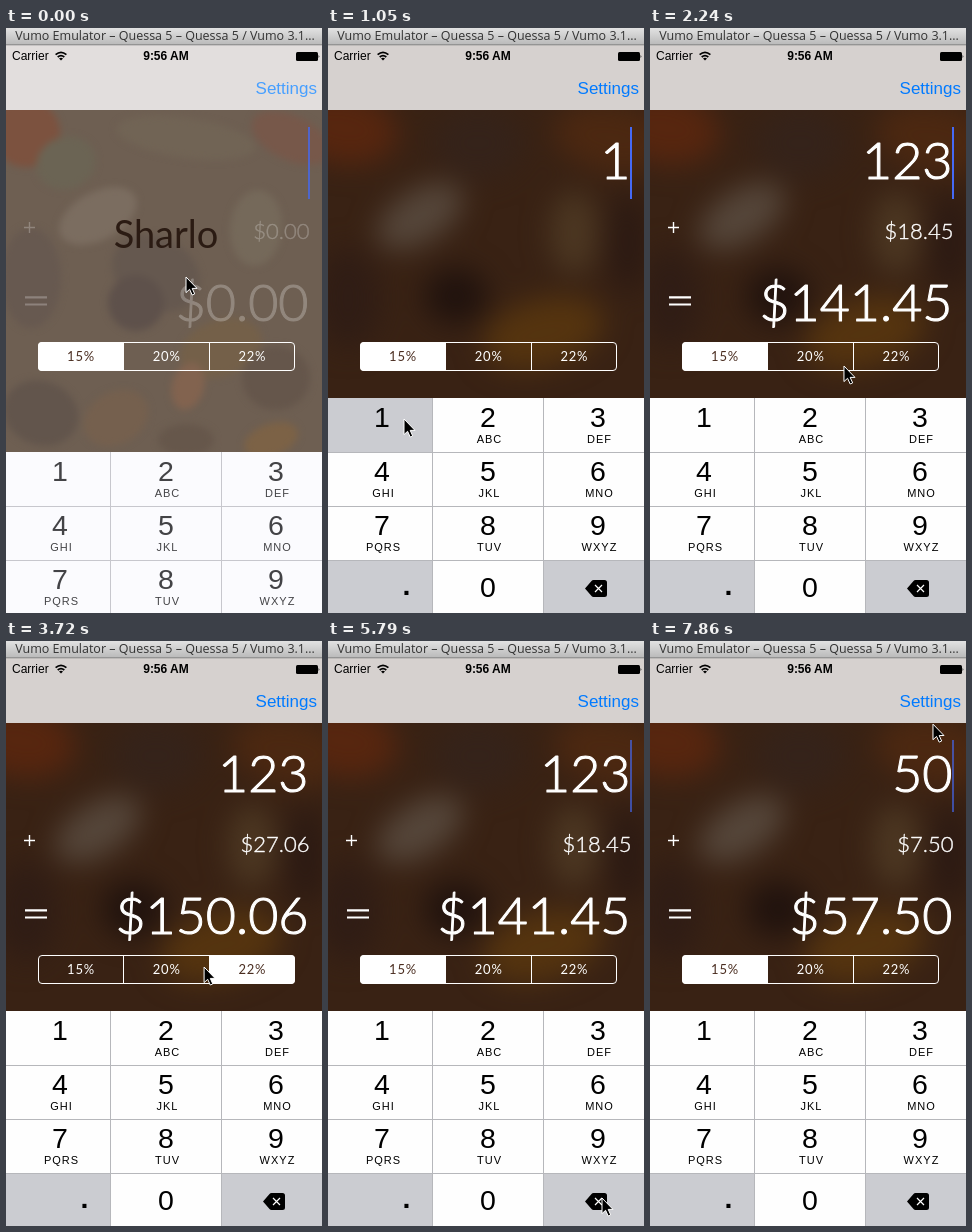
These frames come from a looping animation (316 px wide and 585 px high, 8000 ms). An HTML page:

```html
<!DOCTYPE html>
<html lang="en">
<head>
<meta charset="utf-8">
<title>Tip calculator</title>
<style>
  html, body { margin: 0; width: 100%; height: 100%; overflow: hidden; background: #2f1d14; }
  svg { display: block; width: 316px; height: 585px; }
  filter { color-interpolation-filters: sRGB; }
  .ui { font-family: "Liberation Sans", Arial, sans-serif; }
  .thin { font-family: Lato, sans-serif; font-weight: 300; fill: #fff; stroke: #fff; stroke-linejoin: round; text-anchor: end; }
  .large { font-size: 52px; stroke-width: 1.1px; }
  .small { font-size: 22px; stroke-width: .4px; }
  .mid { text-anchor: middle; }
  .digit { font-size: 28.5px; }
  .letters { font-size: 11px; letter-spacing: 1px; }
  .rate { font: 400 13px Lato, sans-serif; letter-spacing: .8px; }
</style>
</head>
<body>
<svg viewBox="0 0 316 585">
  <defs>
    <linearGradient id="bar" x2="0" y2="1">
      <stop offset="0" stop-color="#e2e2e2"/><stop offset="1" stop-color="#b9b9b9"/>
    </linearGradient>
    <filter id="soft" x="-60%" y="-60%" width="220%" height="220%"><feGaussianBlur stdDeviation="14"/></filter>
    <filter id="patchy" x="-30%" y="-30%" width="160%" height="160%"><feGaussianBlur stdDeviation="3.5"/></filter>
    <clipPath id="pill"><rect x="32" y="314" width="257" height="29" rx="4"/></clipPath>
    <clipPath id="photo"><rect y="82" width="316" height="503"/></clipPath>
  </defs>

  <g clip-path="url(#photo)">
    <rect y="82" width="316" height="503" fill="#392214"/>
    <g id="backdrop" filter="url(#soft)"></g>
    <g id="splash">
      <rect y="82" width="316" height="503" fill="#6e5f52"/>
      <g id="patches" filter="url(#patchy)"></g>
      <text x="160" y="220" class="mid" font-family="Lato, sans-serif" font-size="38" fill="#2b1b13">Sharlo</text>
    </g>
  </g>

  <rect y="17" width="316" height="65" fill="#d6d1cf"/>
  <text x="311" y="66" class="ui" font-size="17" text-anchor="end" fill="#007aff">Settings</text>
  <rect id="haze" y="17" width="316" height="65" fill="#fff"/>

  <rect width="316" height="17" fill="url(#bar)"/>
  <rect y="16.3" width="316" height="1" fill="#858585"/>
  <text x="159" y="12" class="mid" font-family="Open Sans, sans-serif" font-size="12.5" fill="#333">Vumo Emulator – Quessa 5 – Quessa 5 / Vumo 3.1…</text>

  <g class="ui" font-size="12">
    <text x="6" y="32">Carrier</text>
    <text x="160" y="32" class="mid" font-weight="700">9:56 AM</text>
    <path d="M49.6 26.7q5.4-4.8 10.8 0M51.7 29q3.3-2.9 6.6 0" fill="none" stroke="#000" stroke-width="1.7"/>
    <path d="M53 30.4q2-1.5 4 0l-2 2.2z"/>
    <rect x="290" y="24" width="22" height="9" rx="1.5"/>
    <path d="M312.6 26.8q1.6 1.7 0 3.4z"/>
  </g>

  <text id="bill" x="302.5" y="151" class="thin large"></text>
  <g id="amounts">
    <path d="M18 199.5h11M23.5 194v11" stroke="#fff" stroke-width="1.4"/>
    <path d="M19 269.3h22M19 276.5h22" stroke="#fff" stroke-width="2.2"/>
    <text id="tip" x="303.5" y="211" class="thin small"></text>
    <text id="total" x="302.5" y="293" class="thin large"></text>
  </g>
  <rect id="caret" x="302" y="99" width="2" height="72" fill="#4569f5"/>

  <g id="rates" clip-path="url(#pill)"></g>
  <path d="M117.5 314v29M203.5 314v29" stroke="#fff"/>
  <rect x="32.5" y="314.5" width="256" height="28" rx="3.5" fill="none" stroke="#fff"/>

  <g id="keyboard" class="ui"></g>

  <path id="pointer" d="M0 0V15.6L3.6 12.3L6.2 18L8.7 16.9L6.2 11.4H11Z" stroke="#fff" stroke-width="1" stroke-linejoin="round"/>
</svg>

<script>
const LOOP = 8000, STEP = LOOP / 54;
const KEY_HOLD = 140, FADE = 400;

// time, bill, key pressed
const typing = [
  [-300, '', ''], [1036, '1', '1'], [1325, '12', '2'], [1770, '123', '3'],
  [5920, '12', 'del'], [6215, '1', 'del'], [6510, '', 'del'],
  [6810, '5', '5'], [7255, '50', '0']
];
// time, chosen segment
const choices = [[0, 0], [2510, 1], [3105, 2], [3995, 1], [4735, 0]];
// time, x, y of the pointer tip
const route = [
  [0, 180, 249], [150, 180, 249], [850, 76, 391], [1050, 76, 391], [1333, 152, 405],
  [1480, 156, 405], [1778, 258, 408], [1900, 258, 408], [2222, 194, 338], [2400, 165, 331],
  [2670, 165, 331], [2963, 240, 330], [3556, 240, 330], [3704, 198, 326], [3850, 165, 329],
  [4100, 165, 329], [4445, 78, 331], [4800, 78, 331], [5630, 274, 557], [6530, 274, 557],
  [6815, 178, 452], [6963, 195, 512], [7110, 178, 556], [7300, 178, 556], [7852, 283, 83]
];

const NS = 'http://www.w3.org/2000/svg';
const $ = id => document.getElementById(id);
const clamp = v => Math.max(0, Math.min(1, v));

function add(parent, tag, attrs, text = '') {
  const el = document.createElementNS(NS, tag);
  for (const name in attrs) el.setAttribute(name, attrs[name]);
  el.textContent = text;
  return parent.appendChild(el);
}

function blob(parent, cx, cy, rx, ry, turn, fill) {
  add(parent, 'ellipse', { cx, cy, rx, ry, fill, transform: `rotate(${turn} ${cx} ${cy})` });
}

[
  [15, 100, 55, 36, 10, '#57260f'], [285, 110, 60, 34, 10, '#4c2811'],
  [150, 115, 45, 36, 0, '#35231a'], [92, 188, 48, 26, -32, '#55463a'],
  [246, 205, 24, 42, 0, '#4c3722'], [215, 305, 62, 34, -15, '#55340f'],
  [128, 268, 32, 28, 0, '#21130e'], [300, 215, 20, 50, 0, '#2c1a13'],
  [20, 270, 32, 50, 0, '#301d15']
].forEach(b => blob($('backdrop'), ...b));

[
  [20, 105, 34, 34, 10, '#7c523f'], [60, 135, 30, 26, -20, '#6b6454'],
  [285, 110, 42, 22, 25, '#77584a'], [180, 110, 70, 20, 8, '#716455'],
  [92, 188, 42, 24, -28, '#7b6d60'], [250, 200, 26, 38, 5, '#75695a'],
  [150, 245, 46, 36, 30, '#65584f'], [25, 250, 30, 50, 0, '#675950'],
  [130, 275, 28, 28, 0, '#5e514b'], [215, 320, 42, 28, -20, '#746049'],
  [182, 358, 16, 24, 15, '#82634f'], [110, 390, 34, 26, -30, '#75604e'],
  [35, 385, 38, 32, 20, '#62554c'], [270, 350, 34, 32, 0, '#65564b'],
  [265, 412, 28, 16, -20, '#7c6246'], [180, 412, 28, 16, 0, '#66574b']
].forEach(b => blob($('patches'), ...b));

const segments = ['15%', '20%', '22%'].map((label, i) => ({
  fill: add($('rates'), 'rect', { x: 32 + i * 85.7, y: 314, width: 86, height: 29, fill: '#fff' }),
  text: add($('rates'), 'text', { x: 75 + i * 85.7, y: 333, class: 'rate mid' }, label)
}));

const keys = {};
const keyboard = $('keyboard');
const columns = [[0, 104, 54], [105, 110, 160], [216, 100, 270]];
const LIGHT = '#fefefe', DARK = '#cbccd1';
const layout = [
  ['1', ''], ['2', 'ABC'], ['3', 'DEF'], ['4', 'GHI'], ['5', 'JKL'], ['6', 'MNO'],
  ['7', 'PQRS'], ['8', 'TUV'], ['9', 'WXYZ'], ['.', ''], ['0', ''], ['del', '']
];
add(keyboard, 'rect', { y: 370, width: 316, height: 215, fill: '#b6b7bb' });
layout.forEach(([name, letters], i) => {
  const [x, width, mid] = columns[i % 3];
  const y = 370 + Math.floor(i / 3) * 54 + (i > 2 ? 1 : 0);
  const dark = name === '.' || name === 'del';
  const rect = add(keyboard, 'rect', { x, y, width, height: i > 2 ? 53 : 54 });
  keys[name] = { rect, idle: dark ? DARK : LIGHT, down: dark ? LIGHT : DARK };
  if (name === 'del') {
    add(keyboard, 'path', { d: 'M257 560.5L263.5 553Q264.3 552 265.5 552H276.5Q279 552 279 554.5V566.5Q279 569 276.5 569H265.5Q264.3 569 263.5 568Z' });
    add(keyboard, 'path', { d: 'M267 557l7 7M274 557l-7 7', stroke: '#fff', 'stroke-width': 1.2 });
  } else if (name === '.') {
    add(keyboard, 'text', { x: 78.5, y: 566.5, class: 'digit mid', 'font-weight': 700 }, '.');
  } else {
    const base = name === '0' ? 569 : 399 + Math.floor(i / 3) * 54;
    add(keyboard, 'text', { x: mid, y: base, class: 'digit mid' }, name);
    add(keyboard, 'text', { x: mid + 1.5, y: base + 16, class: 'letters mid' }, letters);
  }
});
const keyHaze = add(keyboard, 'rect', { y: 370, width: 316, height: 215, fill: '#f0f0fa' });

const latest = (list, t) => list.filter(e => e[0] <= t).pop();

function pointerAt(t) {
  const i = route.findIndex(p => p[0] > t);
  if (i < 0) return route[route.length - 1].slice(1);
  const [t0, x0, y0] = route[i - 1], [t1, x1, y1] = route[i];
  const k = (t - t0) / (t1 - t0);
  return [x0 + (x1 - x0) * k, y0 + (y1 - y0) * k];
}

function caretAlpha(elapsed) {
  if (elapsed < 550) return 1;
  const phase = (elapsed + 50) % 1000;
  return phase < 600 ? clamp(phase / 90) : clamp((730 - phase) / 130);
}

function amountsAlpha(t, bill) {
  const flip = typing.filter((e, i) => e[0] <= t && (!i || !e[1] !== !typing[i - 1][1])).pop();
  const k = clamp((t - flip[0]) / FADE);
  return bill ? k : 1 - k;
}

function render(t) {
  const [typedAt, bill, pressed] = latest(typing, t);
  const [, chosen] = latest(choices, t);
  const coming = choices.find(c => c[0] > t && c[0] - t < STEP);
  const rate = [.15, .2, .22][chosen];
  const launch = clamp(1 - t / 450);

  $('splash').style.opacity = launch;
  $('haze').style.opacity = keyHaze.style.opacity = launch * .28;
  keyboard.setAttribute('transform', `translate(0 ${54 * clamp(1 - t / 430) ** 3})`);

  $('bill').textContent = bill;
  $('tip').textContent = '$' + (bill * rate).toFixed(2);
  $('total').textContent = '$' + (bill * (1 + rate)).toFixed(2);
  $('amounts').style.opacity = amountsAlpha(t, bill);
  $('caret').style.opacity = caretAlpha(bill ? t - typedAt : t) * (1 - launch * .25);

  segments.forEach(({ fill, text }, i) => {
    fill.style.opacity = i === chosen ? 1 : coming && coming[1] === i ? .25 : 0;
    text.style.fill = i === chosen ? '#4a2d20' : '#fff';
  });
  for (const name in keys) {
    const key = keys[name];
    key.rect.style.fill = name === pressed && t - typedAt < KEY_HOLD ? key.down : key.idle;
  }
  $('pointer').setAttribute('transform', `translate(${pointerAt(t)})`);
}

function tick(now) {
  render(Math.floor((now % LOOP) / STEP) * STEP);
  requestAnimationFrame(tick);
}
render(0);
requestAnimationFrame(tick);
</script>
</body>
</html>
```
